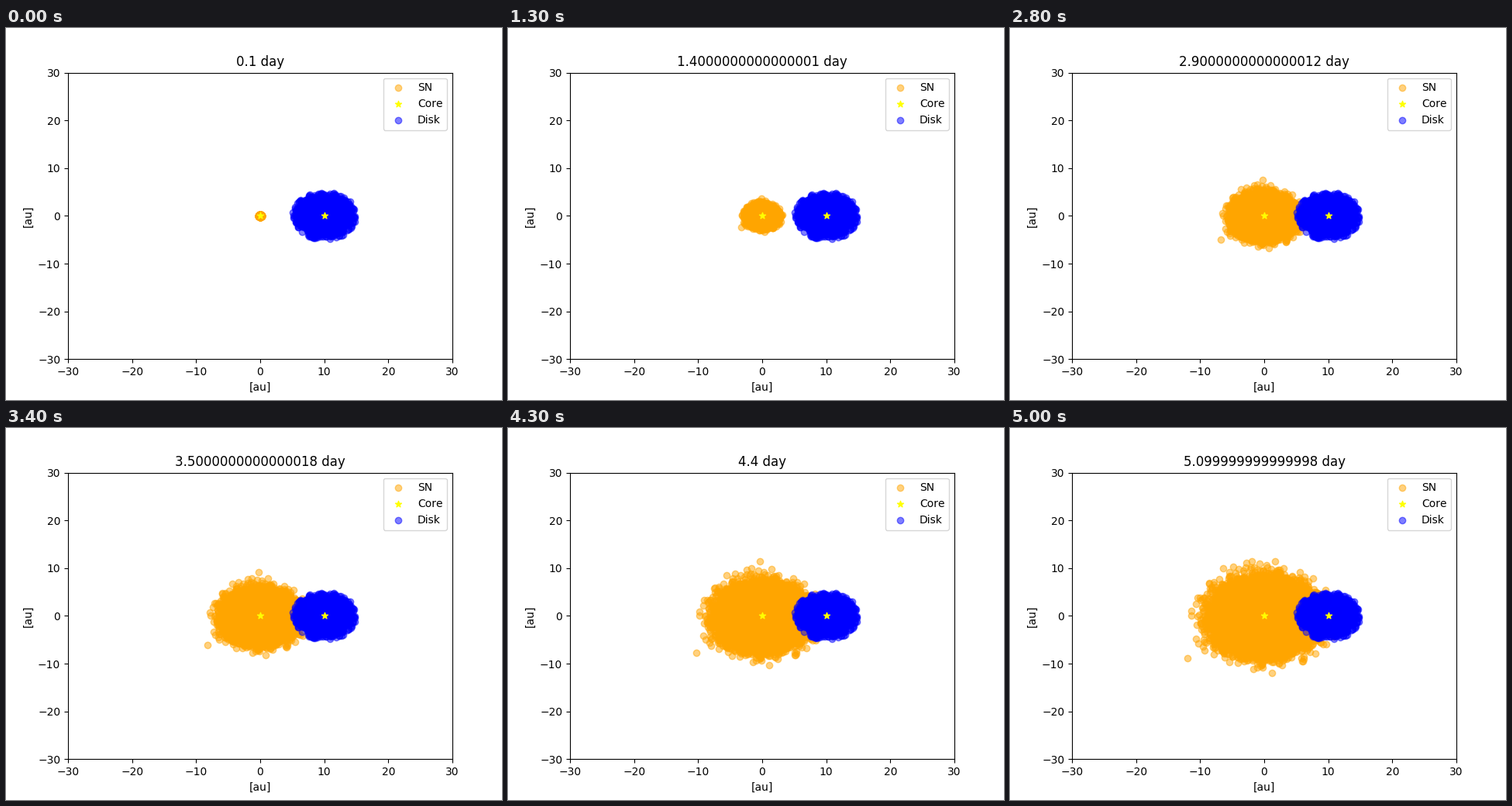
Write a matplotlib script that moves like this. It is 640x480 px and loops after 5100 ms.

```python
from itertools import accumulate

import numpy as np
import matplotlib.pyplot as plt
from matplotlib.animation import FuncAnimation

STEP = 0.1          # days per frame
FRAMES = 51
SIGMA = 0.6         # spread of ejecta speed, au/day
MAX_SPEED = 2.35    # au/day
MAX_HEIGHT = 12.5   # ejecta above this height are lost, au
STRAYS = [(-2.35, -1.74), (-0.07, 2.6)]  # the two fastest ejecta, au/day

# Glyph advances snapped to whole pixels.
plt.rcParams["text.kerning_factor"] = 6
rng = np.random.default_rng(7)
# Repeated addition keeps the floating point drift shown in the title.
days = list(accumulate([STEP] * FRAMES))


def ejecta_velocities(n=25000):
    v = rng.normal(0, SIGMA, (n, 2))
    return np.vstack([v[np.hypot(*v.T) < MAX_SPEED], STRAYS])


def disk_positions(n=1000, radius=5):
    # A uniform ball seen in projection.
    ball = rng.normal(size=(n, 3))
    ball /= np.linalg.norm(ball, axis=1, keepdims=True)
    return ball[:, :2] * radius * np.cbrt(rng.random((n, 1))) + (10, 0)


velocity = ejecta_velocities()
disk = disk_positions()

fig, ax = plt.subplots(figsize=(6.4, 4.8), dpi=100)
ejecta = ax.scatter([], [], color="orange", alpha=0.5, label="SN", zorder=1)
ax.scatter([0, 10], [0, 0], color="yellow", marker="*", label="Core", zorder=3)
ax.scatter(*disk.T, color="blue", alpha=0.5, label="Disk", zorder=2)
ax.set(xlim=(-30, 30), ylim=(-30, 30), xlabel="[au]", ylabel="[au]")
ax.legend(loc="upper right")
title = ax.set_title("")


def update(i):
    pos = velocity * days[i]
    ejecta.set_offsets(pos[pos[:, 1] < MAX_HEIGHT])
    title.set_text(f"{days[i]} day")
    return ejecta, title


anim = FuncAnimation(fig, update, frames=FRAMES, interval=1000 * STEP,
                     repeat=True, repeat_delay=0)
plt.show()
```
